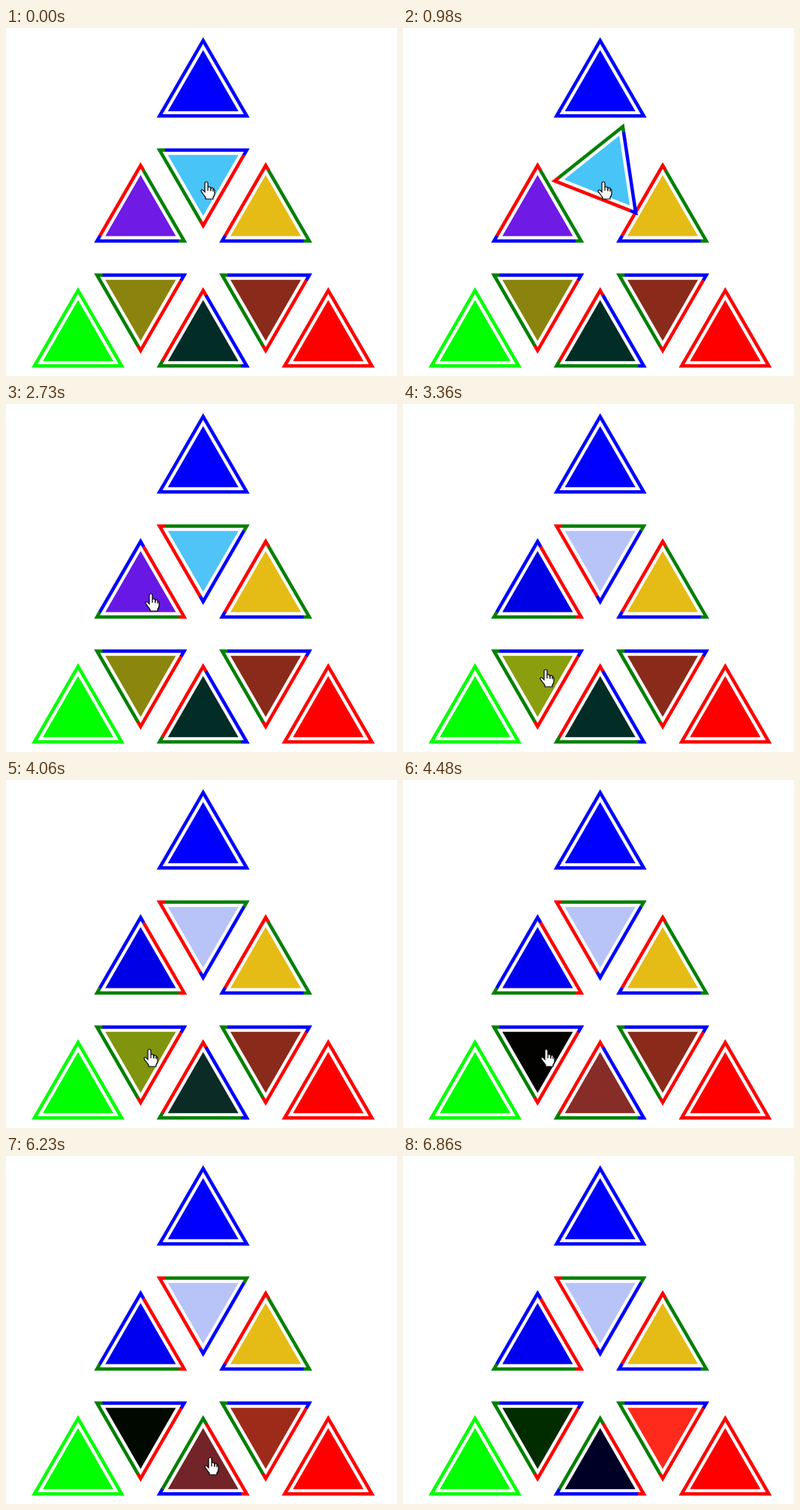
An HTML page with a canvas for the animation above (7.28 s loop, 521x464 px).

```html
<!DOCTYPE html>
<html>
<head>
<meta charset="utf-8">
<style>
html, body { margin: 0; overflow: hidden; background: #fff; }
canvas { display: block; }
</style>
</head>
<body>
<canvas id="stage" width="521" height="464"></canvas>
<script>
const ctx = document.getElementById('stage').getContext('2d');
const LOOP = 7280, TICK = 70, DURATION = 700;
const EDGE_RADIUS = 67.1, FILL_RADIUS = 54.3, EDGE_WIDTH = 4.5, WRAP = 8;
const PIVOT = 14;  // distance from the local origin to the centroid

// edges: colour of the edge leading clockwise into each corner
const RGB = ['red', 'green', 'blue'];
const tri = (col, y, up, fill, edges = RGB, extra = {}) =>
  ({ x: 96 + col * 83.35, y, up, fill, edges, fades: [], ...extra });
const solid = c => [c, c, c];

const triangles = [
  tri(2, 83.8, true, [0, 0, 255], solid('#00f')),
  tri(0, 417, true, [0, 255, 0], solid('#0f0')),
  tri(4, 417, true, [255, 0, 0], solid('#f00')),
  tri(3, 250.4, true, [229, 188, 21]),
  tri(2, 196.3, false, [73, 196, 247], RGB,
    { turn: 582, fades: [[2555, [184, 196, 247]]] }),
  tri(1, 250.4, true, [111, 26, 229], RGB,
    { turn: 1643, fades: [[2555, [0, 0, 229]], [3885, [0, 0, 240]]] }),
  tri(1, 363, false, [138, 132, 14], RGB,
    { fades: [[2555, [138, 158, 14]], [3885, [0, 0, 0]], [5985, [0, 44, 0]]] }),
  tri(3, 363, false, [138, 42, 26], RGB,
    { fades: [[5985, [255, 42, 28]]] }),
  tri(2, 417, true, [2, 44, 38], ['red', 'blue', 'green'],
    { turn: 5015, fades: [[3885, [138, 44, 40]], [5985, [0, 0, 38]]] }),
];

// time, x, y of the fingertip
const pointerPath = [
  [0, 267, 205], [1340, 267, 205], [1540, 193, 253],
  [3270, 193, 253], [3360, 190, 354], [3500, 191, 359],
  [4630, 191, 359], [4830, 272, 402], [6730, 272, 402], [6860, 278, 425],
];
const hand = new Path2D('M-2 2a2 2 0 0 1 4 0V8Q2 6.6 4 6.8T6 9Q6.5 7.5 8 8T9 10' +
  'Q11 9.6 11 12V16Q11 18.500 9 20.500V23H-1V21L-5 15.500Q-8 12 -6.500 11Q-5 10 -2 13.500Z');
const folds = new Path2D('M2 8V12M6 9V12.5M9 10V13');

const clamp = v => Math.max(0, Math.min(1, v));
const mix = (a, b, p) => a + (b - a) * p;
const cubicInOut = t => t < 0.5 ? 4 * t ** 3 : 1 - 4 * (1 - t) ** 3;
const progress = (time, start) => cubicInOut(clamp((time - start) / DURATION));

function corner(k, radius) {
  const a = (k * 120 - 90) * Math.PI / 180;
  return [radius * Math.cos(a), radius * Math.sin(a)];
}

function trace(points) {
  ctx.beginPath();
  points.forEach(p => ctx.lineTo(...p));
}

function along(a, b, distance) {
  const p = distance / Math.hypot(b[0] - a[0], b[1] - a[1]);
  return [mix(a[0], b[0], p), mix(a[1], b[1], p)];
}

function fillAt(t, time) {
  return t.fades.reduce((color, [start, next]) => {
    const p = progress(time, start);
    return color.map((v, i) => mix(v, next[i], p));
  }, t.fill);
}

function drawTriangle(t, time) {
  const p = t.turn ? progress(time, t.turn) : 0;
  const angle = p * Math.PI * 2 / 3;
  const k = t.up ? PIVOT : -PIVOT;
  ctx.save();
  // translation and rotation are interpolated separately, so the centre drifts mid-turn
  ctx.translate(t.x + k * (p * Math.sqrt(3) / 2 - Math.sin(angle)),
                t.y + k * (1.5 * p + Math.cos(angle) - 1));
  ctx.rotate(angle + (t.up ? 0 : Math.PI));
  const c = [0, 1, 2].map(i => corner(i, EDGE_RADIUS));
  trace(c);
  ctx.fillStyle = '#fff';
  ctx.fill();
  ctx.lineWidth = EDGE_WIDTH;
  t.edges.forEach((color, i) => {
    const from = c[(i + 2) % 3], to = c[i], next = c[(i + 1) % 3];
    trace([along(from, to, WRAP - 0.5), to, along(to, next, WRAP)]);
    ctx.strokeStyle = color;
    ctx.stroke();
  });
  trace([0, 1, 2].map(i => corner(i, FILL_RADIUS)));
  ctx.fillStyle = `rgb(${fillAt(t, time).map(Math.round)})`;
  ctx.fill();
  ctx.restore();
}

function drawPointer(time) {
  const i = pointerPath.findIndex(key => key[0] > time);
  if (i < 0) return;
  const [t0, x0, y0] = pointerPath[i - 1], [t1, x1, y1] = pointerPath[i];
  const p = (time - t0) / (t1 - t0);
  ctx.save();
  ctx.translate(mix(x0, x1, p), mix(y0, y1, p));
  ctx.fillStyle = '#fff';
  ctx.strokeStyle = '#000';
  ctx.lineWidth = 1.2;
  ctx.fill(hand);
  ctx.stroke(hand);
  ctx.stroke(folds);
  ctx.restore();
}

function frame() {
  const time = Math.floor(performance.now() % LOOP / TICK) * TICK;
  ctx.fillStyle = '#fff';
  ctx.fillRect(0, 0, 521, 464);
  triangles.forEach(t => drawTriangle(t, time));
  drawPointer(time);
  requestAnimationFrame(frame);
}
frame();
</script>
</body>
</html>
```
